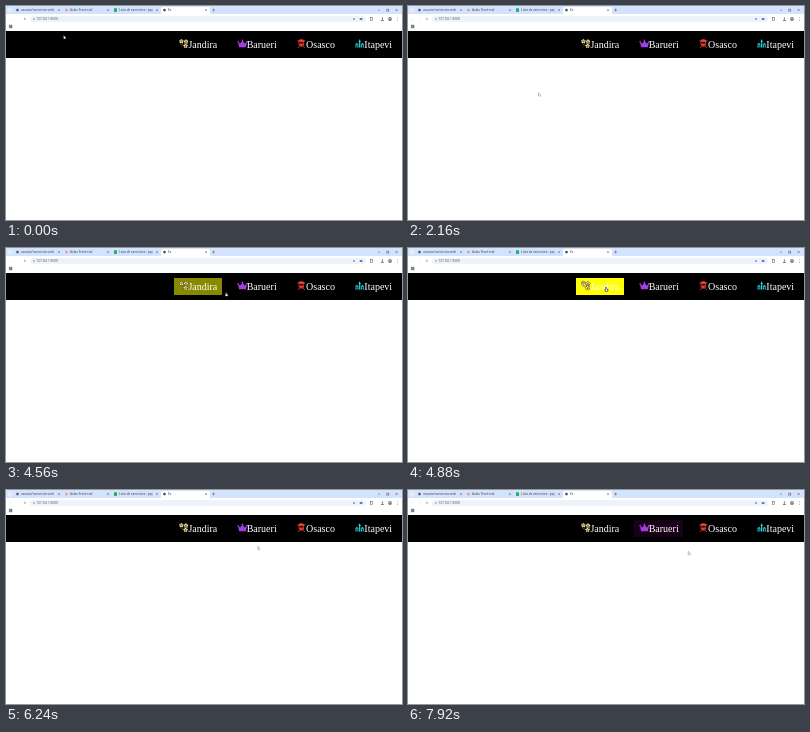
An HTML page with a canvas that plays this animation: 396 px wide and 214 px high, repeating every 8 s.

```html
<!DOCTYPE html>
<html lang="pt-BR">
<head>
<meta charset="utf-8">
<title>Menu</title>
<style>
html, body { margin: 0; width: 100%; height: 100%; overflow: hidden; background: #fff; }
canvas { display: block; width: 396px; height: 214px; }
</style>
</head>
<body>
<canvas id="stage" width="396" height="214"></canvas>
<script>
const ctx = document.getElementById('stage').getContext('2d');
const LOOP = 8000, STEP = 80, FADE = 500;
const SERIF = '10px "Liberation Serif", serif';
const SANS = '3.2px Roboto, sans-serif';
const INK = '#454d57';

// Each move runs from start to end (ms) and stops at x, y
const origin = { x: 57.6, y: 29.3 };
const moves = [
  { start: 1360, end: 2160, x: 130.5, y: 86.6 },
  { start: 2320, end: 2480, x: 181.7, y: 96.4 },
  { start: 2720, end: 2800, x: 34.4, y: 210 },
  { start: 2800, end: 3040, x: 25.4, y: 180.6 },
  { start: 3440, end: 3920, x: 160, y: 108 },
  { start: 3920, end: 4320, x: 236, y: 48 },
  { start: 4320, end: 4880, x: 197.4, y: 39 },
  { start: 5280, end: 6240, x: 251.8, y: 56.3 },
  { start: 6240, end: 6960, x: 256.6, y: 38.3 },
  { start: 7440, end: 7920, x: 280.2, y: 61.3 }
];

const links = [
  { name: 'Jandira', icon: flowers, fill: '#ffff00', enter: 4380, leave: 5560 },
  { name: 'Barueri', icon: crown, fill: '#800080', enter: 6440, leave: 7620 },
  { name: 'Osasco', icon: train },
  { name: 'Itapevi', icon: houses }
];

const clamp = v => Math.min(1, Math.max(0, v));

function rect(x, y, w, h, color) {
  ctx.fillStyle = color;
  ctx.fillRect(x, y, w, h);
}

function frame(x, y, w, h, color) {
  ctx.strokeStyle = color;
  ctx.lineWidth = 0.5;
  ctx.strokeRect(x, y, w, h);
}

function round(x, y, w, h, r, color) {
  ctx.fillStyle = color;
  ctx.beginPath();
  ctx.roundRect(x, y, w, h, r);
  ctx.fill();
}

function disc(x, y, r, color) {
  ctx.fillStyle = color;
  ctx.beginPath();
  ctx.arc(x, y, r, 0, 7);
  ctx.fill();
}

function line(x0, y0, x1, y1, color, width = 0.5) {
  ctx.strokeStyle = color;
  ctx.lineWidth = width;
  ctx.beginPath();
  ctx.moveTo(x0, y0);
  ctx.lineTo(x1, y1);
  ctx.stroke();
}

function triangle(x, y, half, height, color) {
  ctx.fillStyle = color;
  ctx.beginPath();
  ctx.moveTo(x, y);
  ctx.lineTo(x + half, y + height);
  ctx.lineTo(x - half, y + height);
  ctx.fill();
}

function cross(x, y, r) {
  line(x - r, y - r, x + r, y + r, INK);
  line(x - r, y + r, x + r, y - r, INK);
}

function label(text, x, y, font, color) {
  ctx.font = font;
  ctx.fillStyle = color;
  ctx.fillText(text, x, y);
}

// Icons fill a box of about 10 by 9
function flower(x, y) {
  const petals = (r, color) => {
    for (let i = 0; i < 5; i++) {
      const a = (i * 0.4 - 0.5) * Math.PI;
      disc(x + Math.cos(a) * 1.4, y + Math.sin(a) * 1.4, r, color);
    }
  };
  petals(1.15, '#40391c');
  petals(0.8, '#fff0b4');
  disc(x, y, 0.6, '#b98a28');
}

function flowers() {
  line(1.8, 5.2, 5, 6.8, '#8f8048', 0.6);
  flower(2.4, 2.4);
  flower(7, 2.8);
  flower(6.6, 6.9);
}

function crown() {
  const color = '#a23fe0';
  ctx.fillStyle = color;
  ctx.beginPath();
  for (let i = 0; i < 5; i++) ctx.lineTo(0.6 + i * 2.3, i % 2 ? 4.4 : 2.6 - i * (4 - i) * 0.3);
  ctx.lineTo(8.6, 8.3);
  ctx.lineTo(1.8, 8.3);
  ctx.fill();
  for (let i = 0; i < 3; i++) disc(0.8 + i * 4.4, i % 2 ? 1.4 : 2.7, 0.8, color);
}

function train() {
  const red = '#ee4038', dark = '#2a0806';
  round(2, 0.2, 5.4, 7.2, 2, red);
  rect(0.8, 1.4, 7.8, 0.9, red);
  rect(2.6, 2.9, 4.2, 1.7, dark);
  for (const side of [-1, 1]) {
    disc(4.7 + side * 1.5, 6, 0.55, dark);
    line(4.7 + side * 1.8, 7.2, 4.7 + side * 3.3, 9, red, 0.8);
  }
}

function houses() {
  const cyan = '#2ad2d6';
  triangle(4.7, 0, 1.2, 3, cyan);
  rect(4.1, 2.6, 1.2, 6, cyan);
  for (const x of [2, 7.4]) {
    triangle(x, 3.8, 2, 2, cyan);
    rect(x - 1.5, 6.2, 1.1, 2.3, cyan);
    rect(x + 0.4, 6.2, 1.1, 2.3, cyan);
  }
}

function tabStrip() {
  rect(0, 0, 396, 8, '#d3e3fd');
  round(1.5, 1.5, 5, 5, 1.5, '#e2ecfd');
  round(155, 1, 49, 8, [2, 2, 0, 0], '#fff');
  const titles = ['usuario/exercicios-web', 'Aulas Front-end', 'Lista de exercicios - pagina', 'Ex'];
  const colors = ['#5a6069', '#e59a83', '#20b15a', '#50555d'];
  titles.forEach((title, i) => {
    const x = 11.5 + i * 49;
    if (i === 2) rect(x - 1.5, 2.3, 3, 3.6, colors[i]);
    else disc(x, 4.1, 1.4, colors[i]);
    ctx.save();
    ctx.beginPath();
    ctx.rect(x, 0, 37, 8);
    ctx.clip();
    label(title, x + 3.5, 5.3, SANS, INK);
    ctx.restore();
    cross(x + 41.5, 4.1, 0.8);
  });
  line(206.2, 4, 209, 4, INK);
  line(207.6, 2.6, 207.6, 5.4, INK);
  line(372, 4.2, 374, 4.2, INK);
  frame(380.8, 3.1, 2, 2, INK);
  cross(390.6, 4.1, 1);
}

function toolbar() {
  label('←', 3, 14.2, SANS, '#8d9299');
  label('→', 10.2, 14.2, SANS, '#b4b8bd');
  label('↻', 17.8, 14.2, SANS, '#5b6068');
  round(24, 10, 336, 6, 3, '#eef2f9');
  disc(28, 13, 0.8, '#80868e');
  label('127.0.0.1:5500', 30.5, 14.1, SANS, '#555b64');
  disc(348, 13, 1, '#6c97d0');
  round(353.6, 12, 3, 2, 0.8, '#4c84c8');
  frame(364.3, 11.6, 2.4, 2.7, INK);
  line(376.4, 11.4, 376.4, 13.6, INK, 0.8);
  line(375, 14.4, 377.8, 14.4, INK, 0.8);
  disc(384, 13, 1.9, '#737780');
  disc(384, 12.6, 0.8, '#c9cbd0');
  for (let i = 0; i < 3; i++) disc(391.5, 11.6 + i * 1.4, 0.35, INK);
  for (let i = 0; i < 4; i++) frame(3.2 + (i % 2) * 1.7, 19.1 + (i >> 1) * 1.7, 1.1, 1.1, INK);
}

function hoverLevel({ enter, leave }, t) {
  const ease = p => Math.sin(clamp(p) * Math.PI / 2);
  return t < leave ? ease((t - enter) / FADE) : 1 - ease((t - leave) / FADE);
}

function menu(t) {
  rect(0, 25, 396, 27, '#000');
  let x = 168;
  for (const link of links) {
    ctx.font = SERIF;
    const width = 19.4 + ctx.measureText(link.name).width;
    if (link.fill) {
      ctx.globalAlpha = hoverLevel(link, t);
      rect(Math.round(x), 30, Math.round(width), 17, link.fill);
      ctx.globalAlpha = 1;
    }
    ctx.save();
    ctx.translate(x + 5, 33);
    link.icon();
    ctx.restore();
    label(link.name, x + 14.4, 42.3, SERIF, '#fff');
    x += width + 10;
  }
}

function pointerAt(t) {
  let { x, y } = origin;
  for (const m of moves) {
    const p = clamp((t - m.start) / (m.end - m.start));
    x += (m.x - x) * p;
    y += (m.y - y) * p;
  }
  return { x, y };
}

function arrow() {
  ctx.beginPath();
  ctx.moveTo(0, 0);
  ctx.lineTo(0, 3.4);
  ctx.lineTo(1.7, 3.6);
  ctx.lineTo(2.2, 2.2);
  ctx.closePath();
  ctx.fillStyle = '#fff';
  ctx.fill();
  ctx.strokeStyle = '#444';
  ctx.lineWidth = 0.35;
  ctx.stroke();
}

function hand() {
  round(0, 0, 1.2, 3.6, 0.5, '#222');
  round(-0.7, 1.7, 3.6, 2.8, 1, '#222');
  rect(0.35, 0.4, 0.55, 2.2, '#fff');
  round(0, 2.2, 2.2, 1.7, 0.6, '#fff');
}

function pointer(t) {
  if (t >= 2640 && t < 2800) return;
  const { x, y } = pointerAt(t);
  const over = links.some(l => t >= l.enter && t < l.leave);
  ctx.save();
  ctx.translate(x, y);
  if (over) hand();
  else arrow();
  ctx.restore();
}

function draw(t) {
  rect(0, 0, 396, 214, '#fff');
  tabStrip();
  toolbar();
  menu(t);
  pointer(t);
}

function tick() {
  const t = performance.now() % LOOP;
  draw(Math.floor(t / STEP) * STEP);
  requestAnimationFrame(tick);
}
tick();
</script>
</body>
</html>
```
